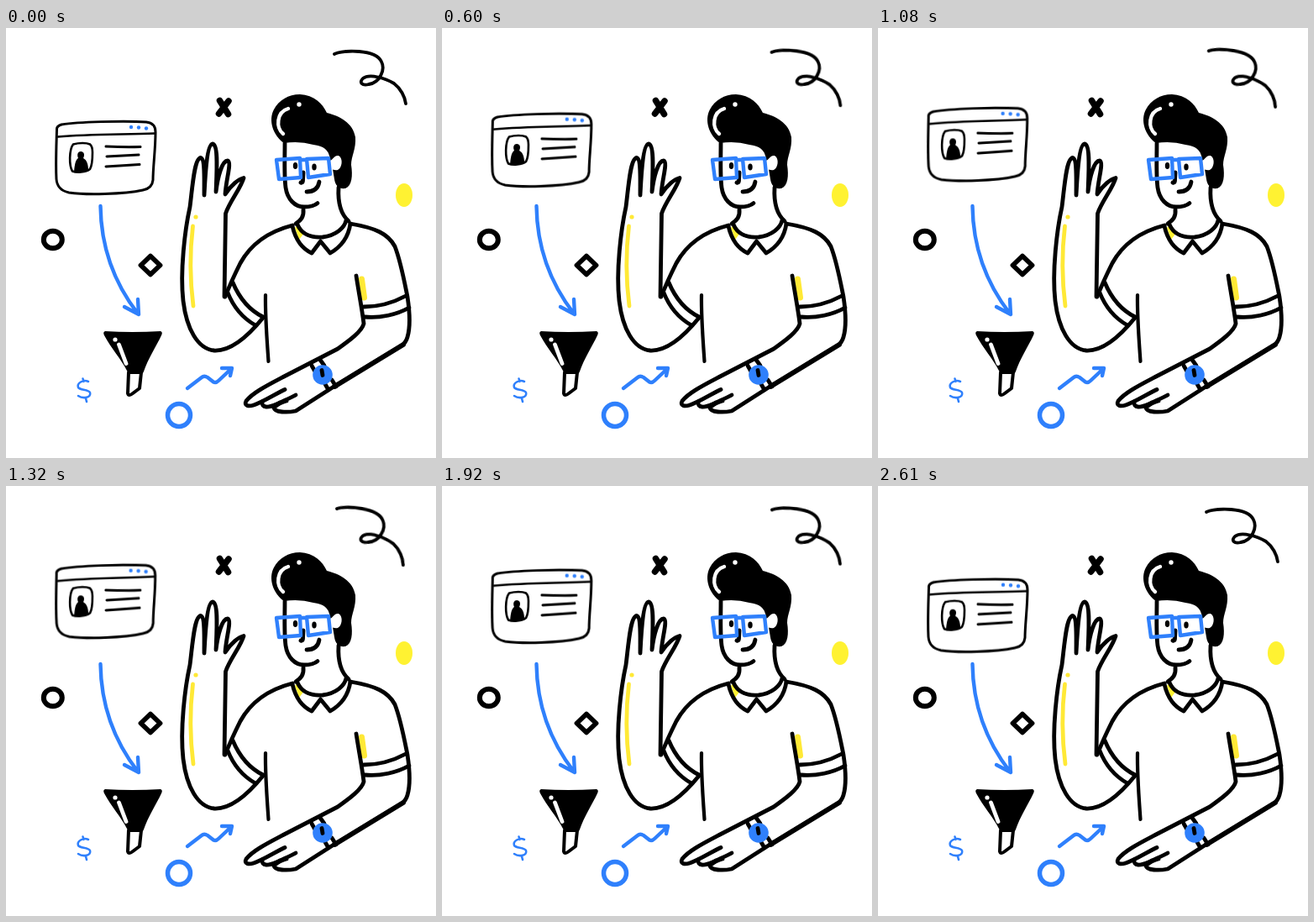
Animation, 512 px wide and 512 px high, one loop 2640 ms. Source, as an HTML page without scripts:

```html
<!DOCTYPE html>
<html lang="en">
<head>
<meta charset="utf-8">
<title>Lead funnel illustration</title>
<style>
  html, body { margin: 0; width: 100%; height: 100%; overflow: hidden; background: #fff; }
  svg { display: block; width: 100%; height: 100%; }
  .line { fill: none; stroke: #000; stroke-width: 4.8; stroke-linecap: round; stroke-linejoin: round; }
  .thin { stroke-width: 3; }
  .fine { stroke-width: 2.6; }
  .blue { stroke: #2f80fc; stroke-width: 4.4; }
  .yellow { stroke: #ffe936; }
  .white { stroke: #fff; }
  .blue-fill { fill: #2f80fc; }
  .yellow-fill { fill: #fff232; }
  .white-fill { fill: #fff; }

  .card, .squiggle { animation: 2640ms infinite; }
  .card { animation-name: lift; transform-origin: 118px 155px; }
  .squiggle { animation-name: sway; transform-origin: 433px 60px; }
  @keyframes lift {
    0%, 100% { transform: none; animation-timing-function: cubic-bezier(.33, .26, .67, 1); }
    50% { transform: translateY(-17px) rotate(-.6deg); animation-timing-function: cubic-bezier(.33, 0, .67, .74); }
  }
  @keyframes sway {
    0%, 100% { transform: none; animation-timing-function: cubic-bezier(.33, .26, .67, 1); }
    50% { transform: rotate(5.6deg); animation-timing-function: cubic-bezier(.33, 0, .67, .74); }
  }
</style>
</head>
<body>
<svg viewBox="0 0 512 512">
  <g class="card">
    <path class="line thin" d="M60.500 121Q60 117 66 115C85 112 140 110 167 112Q178 113 178 124C178 145 175 165 175 181Q174 191 163 193C140 198 95 199 75 196Q61 193 60 180C59 160 60 140 60.500 121Z"/>
    <path class="line fine" d="M62 129.500C100 126 140 127 177 125.500"/>
    <g class="blue-fill">
      <circle cx="149" cy="118" r="2.200"/><circle cx="158" cy="118.500" r="2.200"/><circle cx="167" cy="119.500" r="2.200"/>
    </g>
    <path class="line fine" d="M80 138.500C87 136.500 96 136.500 100 138.500Q103 141 103 148C103 156 103 163 100 168C95 172 84 172.500 79 170.500C75 164 75 145 80 138.500Z"/>
    <path d="M81 171C82 161 83 157 86 155C84 150 86 147 89 147C93 147 94 151 92 155C96 157 98 162 98 170Q89 173 81 171Z"/>
    <path class="line thin" d="M119 141Q140 142 160 141.500M120 153Q140 152 158 151M119 165Q140 163.500 159 162.500"/>
  </g>

  <path class="line squiggle" style="stroke-width:3.800" d="M391 31C402 26 440 25 447 40C452 50 445 65 432 67C424 69 420 65 425 60C433 54 452 60 462 66C470 72 475 82 476 90"/>

  <g class="line">
    <path style="stroke-width:7.500" d="M254.500 86.500L264.500 102.500M265 87L253.500 102"/>
    <ellipse style="stroke-width:6" cx="55.800" cy="252" rx="11" ry="10.200"/>
    <path style="stroke-width:5.800" d="M172 271.500L183.500 282.500L172 293.500L160.500 282.500Z"/>
  </g>
  <ellipse class="yellow-fill" cx="474" cy="199" rx="10" ry="14"/>

  <g class="line blue">
    <path d="M112.500 212C113 255 126 300 157 340M141 332L158 341L157 323"/>
    <path d="M216 429L233 416Q236 413.500 240 416L247 421.500Q250 423 253 420L268 406M257 405L269 405L267 414"/>
    <circle style="stroke-width:5.500" cx="206" cy="461" r="13.500"/>
    <path class="fine" d="M98 421C92 418 84 423 86 428C88 431.500 98 430 100 434C102 440 92 442 86 438M91.500 417.500L92.500 421M95 441L96 445"/>
  </g>

  <!-- funnel -->
  <path d="M118 361Q150 363 184 361Q187 362 185 366C179 379 169 394 164 409Q163 412 160 412H148Q145 411 144 408C137 394 125 381 117 366Q115 362 118 361Z"/>
  <circle class="white-fill" cx="130" cy="371" r="2.600"/>
  <path class="line white" d="M134.500 377L143 399.500"/>
  <path class="line" style="stroke-width:4" d="M146 410L145 435Q146 439 151 435L159 429L161 410"/>

  <!-- raised arm -->
  <g class="line">
    <path d="M306 345C289 366 269 385 248 384C228 382 215 358 211 325C207 290 213 240 219 213C222 190 224 155 232 154.500C237 156 236 175 236 199C237 180 239 138 246 138C253 139 251 170 250 195C252 178 257 158 264 158C269 160 262 180 261 198C268 187 277 180 283 178.500C279 192 266 207 261.500 221L260 320"/>
    <path d="M270 303C278 322 290 336 306 344M264 315C271 333 283 346 297 354"/>
    <path class="yellow" d="M222.500 236C219 265 219 300 223 331"/>
  </g>
  <circle cx="226" cy="225" r="2.600" fill="#ffe936"/>

  <!-- shirt and lower arm -->
  <path class="line yellow" style="stroke-width:7" d="M423.500 299L426.500 321"/>
  <path class="yellow-fill" d="M344 238L348 233L355 244L349 252Z"/>
  <g class="line">
    <path d="M341 235C310 243 290 260 279 280C272 294 266 307 261 320"/>
    <path style="stroke-width:4.200" d="M309 318C308.500 345 311 375 312.500 397"/>
    <path d="M354 216C355 225 351 229 345 233M396 190C395 207 399 222 408 230"/>
    <path d="M347 234C352 246 364 250 377 249C393 247 403 238 405 229M341 236C345 253 353 263 364 268L374.500 254L386 268C400 260 408 247 410 233"/>
    <path d="M410 233C440 238 455 245 463 260C470 278 474 300 478 320C481 340 481 358 478 368Q476 375 471 378L388 428.500L345 456C335 458 320 458 319 452"/>
    <path style="stroke-width:5.800" d="M473 377L391 427"/>
    <path d="M426 332C445 332 461 327 476 319M427 344C445 346 466 341 480 333"/>
    <path d="M417 295C420 315 424 335 426 352C424 361 409 372 395 382L330 415.500C312 425 294 434 286 444C283 450 289 451 295 449C307 445 320 436 332 430.500"/>
    <path d="M305 445C304 453 313 452 322 448C330 444 338 441 345 437M319 452Q326 446 334 444"/>
    <path d="M364 402L368 409M374 395L379 402M380 424L384 431M388 419L393 427"/>
  </g>
  <circle class="blue-fill" cx="377" cy="413" r="11.800"/>
  <path class="line" d="M376 407.500L377 413.500"/>

  <!-- head -->
  <path d="M331 137C318 128 312 110 319 97C325 86 336 79 350 79C367 80 377 90 382 101C398 105 413 113 416 130C417 144 411 153 411 163C413 176 412 188 404 191C397 192 392 188 391 180L389 168L386 156C384 144 378 141 366 139Q349 134 331 137Z"/>
  <path class="white-fill" d="M386 158C389 157 391 151 396 152C402 155 400 167 395 169Q391 170 386 167Z"/>
  <path class="line white" style="stroke-width:4.400" d="M336 96C322 100 321 119 330 126"/>
  <circle class="white-fill" cx="349" cy="91" r="2.700"/>
  <g class="line">
    <path d="M332 137C332 156 331 175 333 190C335 204 344 213 355 213Q366 213 371 208.500"/>
    <path d="M354 172L353.500 182Q353 185 351 184M358 195Q371 195 373 183"/>
    <path class="blue" d="M322 157L350 155L351 178L325 180ZM358 156L384 155L386 174L360 178ZM350 157H358"/>
  </g>
  <ellipse cx="344.500" cy="164" rx="2.700" ry="4"/>
  <ellipse cx="367" cy="165.500" rx="2.700" ry="4"/>
</svg>
</body>
</html>
```
